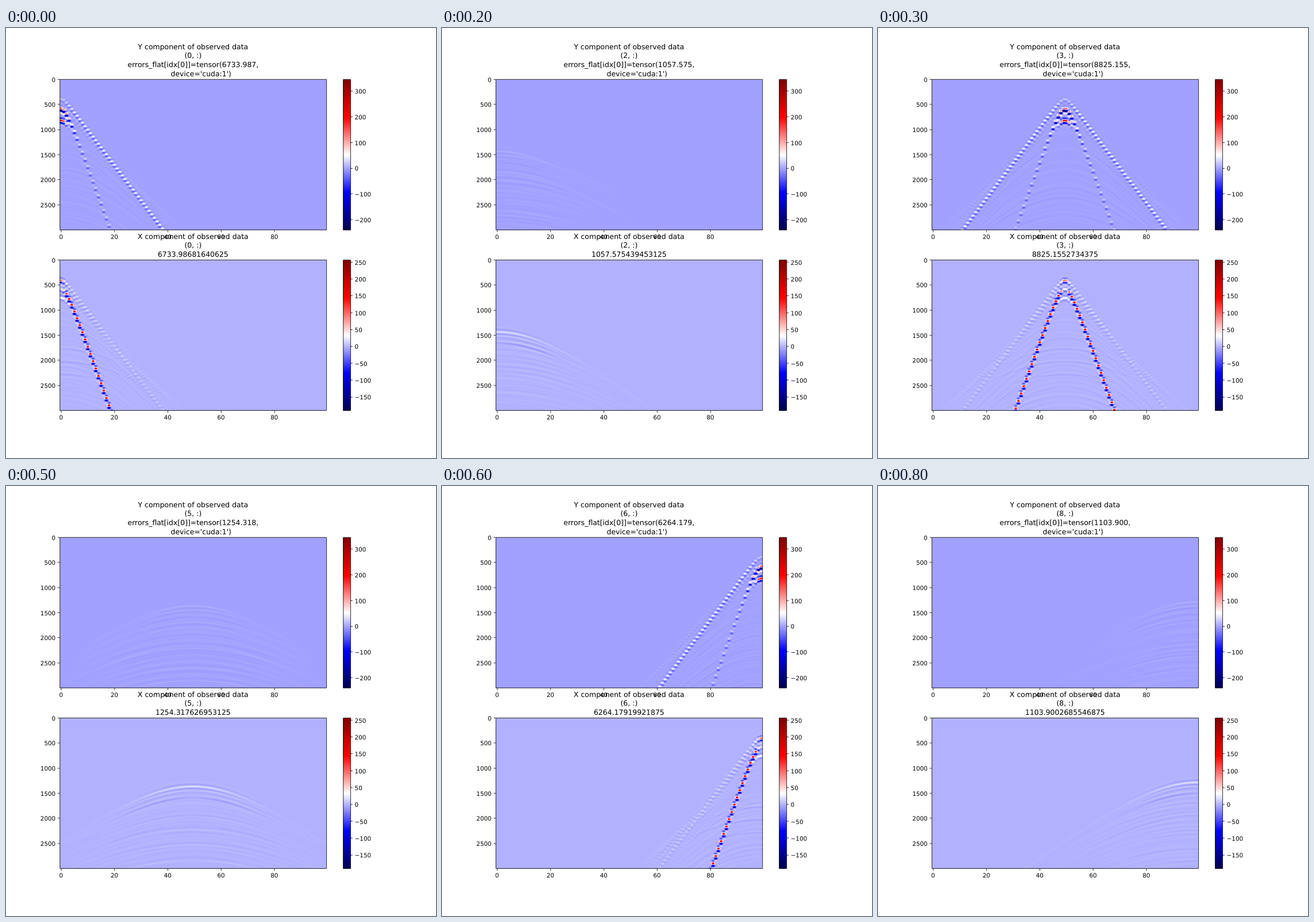
An HTML page with a canvas for the animation above (0.9 s loop, 748 by 748 pixels).

```html
<!DOCTYPE html>
<html lang="en">
<head>
<meta charset="utf-8">
<title>Observed data</title>
<style>
  html, body { margin: 0; width: 100%; height: 100%; overflow: hidden; background: #fff; }
  canvas, svg { position: absolute; left: 0; top: 0; width: 748px; height: 748px; }
  text {
    font-family: "DejaVu Sans", sans-serif; font-size: 13.89px;
    white-space: pre; text-rendering: geometricPrecision;
  }
  .title { font-size: 16.67px; text-anchor: middle; }
  .mid { text-anchor: middle; }
  .end { text-anchor: end; }
  .line { fill: none; stroke: #000; stroke-width: 1.11; }
</style>
</head>
<body>
<canvas id="stage" width="1000" height="1000"></canvas>
<svg id="plot" viewBox="0 0 1000 1000">
  <defs>
    <linearGradient id="seismic" x1="0" y1="1" x2="0" y2="0">
      <stop offset="0" stop-color="#00004d"/>
      <stop offset=".25" stop-color="#00f"/>
      <stop offset=".5" stop-color="#fff"/>
      <stop offset=".75" stop-color="#f00"/>
      <stop offset="1" stop-color="#800000"/>
    </linearGradient>
  </defs>
</svg>
<script>
// The figure is laid out on a 1000 by 1000 grid and scaled to the stage.
const LEFT = 125, WIDTH = 620, HEIGHT = 350;
const TRACES = 100, SAMPLES = 3000, STEP = WIDTH / TRACES, FRAME_MS = 100;

const panels = [
  { name: 'Y', top: 120, min: -240, max: 346, ticks: [300, 200, 100, 0, -100, -200] },
  { name: 'X', top: 540, min: -190, max: 256.5, ticks: [250, 200, 150, 100, 50, 0, -50, -100, -150] }
];

// Three source positions, each at three depths; apex is the first arrival time.
const shots = [
  { x: 0, depth: 0, apex: 400, short: '6733.987', long: '6733.98681640625' },
  { x: 0, depth: 1, apex: 1000, short: '1896.412', long: '1896.412109375' },
  { x: 0, depth: 2, apex: 1420, short: '1057.575', long: '1057.575439453125' },
  { x: 49.4, depth: 0, apex: 400, short: '8825.155', long: '8825.1552734375' },
  { x: 48.5, depth: 1, apex: 970, short: '0.', long: '0.0' },
  { x: 49.4, depth: 2, apex: 1350, short: '1254.318', long: '1254.317626953125' },
  { x: 99, depth: 0, apex: 400, short: '6264.179', long: '6264.17919921875' },
  { x: 99, depth: 1, apex: 940, short: '2013.647', long: '2013.6466064453125' },
  { x: 99, depth: 2, apex: 1270, short: '1103.900', long: '1103.9002685546875' }
];

/* ---------- wave field ---------- */

function random(seed) {
  return () => {
    seed = (seed + 0x6D2B79F5) | 0;
    let t = Math.imul(seed ^ (seed >>> 15), 1 | seed);
    t = (t + Math.imul(t ^ (t >>> 7), 61 | t)) ^ t;
    return ((t ^ (t >>> 14)) >>> 0) / 4294967296;
  };
}

const bell = (d, width) => Math.exp(-((d / width) ** 2));

// Arrival time is shift + hypot(t0, slope * d); amp takes distance and signed offset.
const arrival = (shift, t0, slope, period, phase, amp) => ({ shift, t0, slope, period, phase, amp });

function shallow(isY) {
  const refracted = [
    arrival(500, 700, 52, 95, 0, d => 6 * bell(d - 30, 12)),
    arrival(600, 720, 51, 95, 1.5, d => 5 * bell(d - 28, 12))
  ];
  if (isY) return [
    ...refracted,
    arrival(300, 100, 70.5, 98, 1.1, d => 66 * Math.min(1, .3 + d / 7)),
    arrival(420, 130, 68, 95, 1, d => 16 * bell(d - 6, 18)),
    arrival(215, 390, 149, 105, 2.3, d => 62 + 210 * bell(d, 4) - d),
    arrival(250, 570, 135, 105, .4, d => 250 * bell(d, 2))
  ];
  return [
    ...refracted,
    arrival(300, 110, 70.5, 100, .8, d => 11 + 12 * bell(d, 18) + 95 * bell(d, 1.5)),
    arrival(400, 130, 69, 100, 1.5, d => 17 * bell(d, 18)),
    arrival(200, 380, 149, 112, .95, d => 215 * (1 - .85 * bell(d, 1.7))),
    arrival(250, 500, 120, 105, 0, d => 38 * bell(d, 4)),
    arrival(0, 1760, 48, 90, 2, d => 5 * bell(d, 20)),
    arrival(0, 2020, 47, 90, 2.6, d => 6 * bell(d, 24)),
    arrival(0, 2280, 46, 90, 3, d => 4 * bell(d, 20))
  ];
}

function middle(isY, shot) {
  const centred = shot.short === '0.';
  const lit = off => off < 2 ? 1 : .45;
  const late = isY ? 50 : 62;
  return [
    arrival(250, shot.apex - 240, 60, 110, 0, (d, off) =>
      (isY ? 4 + 7 * bell(d - 12, 12) : 5 + 34 * bell(d, 18)) * lit(off)),
    arrival(250, shot.apex - 30, 59, 105, 2.2, (d, off) => (isY ? 14 : 10) * bell(d - 6, 12) * lit(off)),
    arrival(2100, 300, 75, 90, 2.5, (d, off) =>
      centred ? (off > 0 ? late * bell(d - 9, 5) : 14 * bell(d, 9)) : 16 * bell(d, 9)),
    arrival(2200, 340, 60, 90, .5, d => 14 * bell(d - 4, 11)),
    arrival(2320, 360, 45, 85, 2, d => 12 * bell(d - 5, 11))
  ];
}

function deep(isY, shot) {
  const k = isY ? .3 : 1, t0 = shot.apex - 190, slope = shot.x ? 40 : 43;
  return [
    arrival(200, t0, slope, 100, 0, d => k * (2 + 18 * bell(d, 20)) * bell(d, 60)),
    arrival(200, t0 + 95, slope, 95, 1.4, d => k * 9 * bell(d - 8, 15)),
    arrival(200, t0 + 215, slope, 95, 2.6, d => k * 14 * bell(d - 11, 12))
  ];
}

// Weak later reflections that fill the cone behind the first arrival.
function coda(shot, isY) {
  const rand = random(shot.x * 7 + shot.depth * 101 + (isY ? 13 : 29));
  const [shift, slope, near, gain] = [[300, 68, 7, .8], [250, 59, 0, .9], [200, 41, 0, .7]][shot.depth];
  const start = shot.apex - shift;
  return Array.from({ length: 26 }, (_, i) => {
    const t0 = start + 90 + i * (2600 - start) / 26 + rand() * 50;
    const peak = (2 + rand() * 4) * gain * (isY ? 1 : .85);
    const centre = near + rand() * 22, reach = 10 + rand() * 14;
    return arrival(shift, t0, slope * (.88 + rand() * .11), 75 + rand() * 35, rand() * 6.3,
      d => peak * bell(d - centre, reach));
  });
}

function trace(events, offset) {
  const out = new Float32Array(HEIGHT), d = Math.abs(offset), dt = SAMPLES / HEIGHT;
  for (const e of events) {
    const time = e.shift + Math.hypot(e.t0, e.slope * d);
    const amp = e.amp(d, offset), reach = 1.25 * e.period;
    const first = Math.max(0, Math.floor((time - reach) / dt));
    const last = Math.min(HEIGHT - 1, Math.ceil((time + reach) / dt));
    for (let r = first; r <= last; r++) {
      const u = ((r + .5) * dt - time) / e.period;
      out[r] += amp * Math.cos(2 * Math.PI * u + e.phase) * Math.exp(-4 * u * u);
    }
  }
  return out;
}

/* ---------- colour ---------- */

const stops = [[0, 0, 77], [0, 0, 255], [255, 255, 255], [255, 0, 0], [128, 0, 0]];

function seismic(v) {
  const p = Math.min(.9999, v) * 4, i = Math.floor(p);
  return stops[i].map((c, k) => c + (stops[i + 1][k] - c) * (p - i));
}
const palette = Array.from({ length: 256 }, (_, i) => seismic(i / 255));

function render(shot, panel) {
  const isY = panel.name === 'Y';
  const events = [shallow, middle, deep][shot.depth](isY, shot).concat(coda(shot, isY));
  const traces = Array.from({ length: TRACES }, (_, i) => trace(events, i - shot.x));
  const image = new ImageData(WIDTH, HEIGHT);
  const clamp = (v, max) => Math.min(max, Math.max(0, v));
  for (let x = 0; x < WIDTH; x++) {
    const p = (x + .5) / STEP - .5, i = Math.floor(p);
    const mix = .5 - .5 * Math.cos(Math.PI * (p - i));
    const a = traces[clamp(i, TRACES - 1)], b = traces[clamp(i + 1, TRACES - 1)];
    for (let y = 0; y < HEIGHT; y++) {
      const v = (a[y] + (b[y] - a[y]) * mix - panel.min) / (panel.max - panel.min);
      image.data.set([...palette[clamp(Math.floor(256 * v), 255)], 255], 4 * (y * WIDTH + x));
    }
  }
  return image;
}

/* ---------- axes and text ---------- */

const svg = document.getElementById('plot');

function add(tag, attrs, content = '') {
  const node = document.createElementNS('http://www.w3.org/2000/svg', tag);
  for (const key in attrs) node.setAttribute(key, attrs[key]);
  node.textContent = content;
  return svg.appendChild(node);
}
const label = (x, y, cls, content) => add('text', { x, y, class: cls }, content);
const line = d => add('path', { d, class: 'line' });

// Lines sit on pixel centres of the layout grid.
const snapX = x => Math.floor(x + .5) + .5;
const snapY = y => Math.ceil(y - .5) - .5;
const frame = (x, y, w, h) =>
  line(`M${snapX(x)} ${snapY(y)}H${snapX(x + w)}V${snapY(y + h)}H${snapX(x)}z`);

for (const p of panels) {
  const bottom = p.top + HEIGHT, barLeft = 783.75, barWidth = 17.5, barRight = barLeft + barWidth;
  add('rect', { x: barLeft, y: p.top, width: barWidth, height: HEIGHT, fill: 'url(#seismic)' });
  frame(LEFT, p.top, WIDTH, HEIGHT);
  frame(barLeft, p.top, barWidth, HEIGHT);
  for (let i = 0; i < TRACES; i += 20) {
    const x = LEFT + (i + .5) * STEP;
    line(`M${snapX(x)} ${bottom}v4.86`);
    label(x, bottom + 20.7, 'mid', i);
  }
  for (let t = 0; t < SAMPLES; t += 500) {
    const y = p.top + (t + .5) / SAMPLES * HEIGHT;
    line(`M${LEFT} ${snapY(y)}h-4.86`);
    label(LEFT - 9.72, y + 5.2, 'end', t);
  }
  for (const v of p.ticks) {
    const y = p.top + (p.max - v) / (p.max - p.min) * HEIGHT;
    line(`M${barRight} ${snapY(y)}h4.86`);
    label(barRight + 9.72, y + 5.2, '', String(v).replace('-', '\u2212'));
  }
  const count = p.name === 'Y' ? 4 : 3;
  p.lines = Array.from({ length: count }, (_, i) =>
    label(LEFT + WIDTH / 2, p.top - 8.3 - (count - 1 - i) * 20.8, 'title', ''));
}

function titles(panel, index) {
  const shot = shots[index];
  const head = [`${panel.name} component of observed data`, `(${index}, :)`];
  return head.concat(panel.name === 'Y'
    ? [`errors_flat[idx[0]]=tensor(${shot.short},`, "       device='cuda:1')"]
    : [shot.long]);
}

/* ---------- playback ---------- */

const ctx = document.getElementById('stage').getContext('2d');
const images = shots.map(shot => panels.map(panel => render(shot, panel)));
let shown = -1;

function show(index) {
  if (index === shown) return;
  shown = index;
  panels.forEach((panel, k) => {
    ctx.putImageData(images[index][k], LEFT, panel.top);
    titles(panel, index).forEach((content, i) => { panel.lines[i].textContent = content; });
  });
}

const start = performance.now();
function tick(now) {
  show(Math.floor(Math.max(0, now - start) / FRAME_MS) % shots.length);
  requestAnimationFrame(tick);
}
show(0);
requestAnimationFrame(tick);
</script>
</body>
</html>
```
